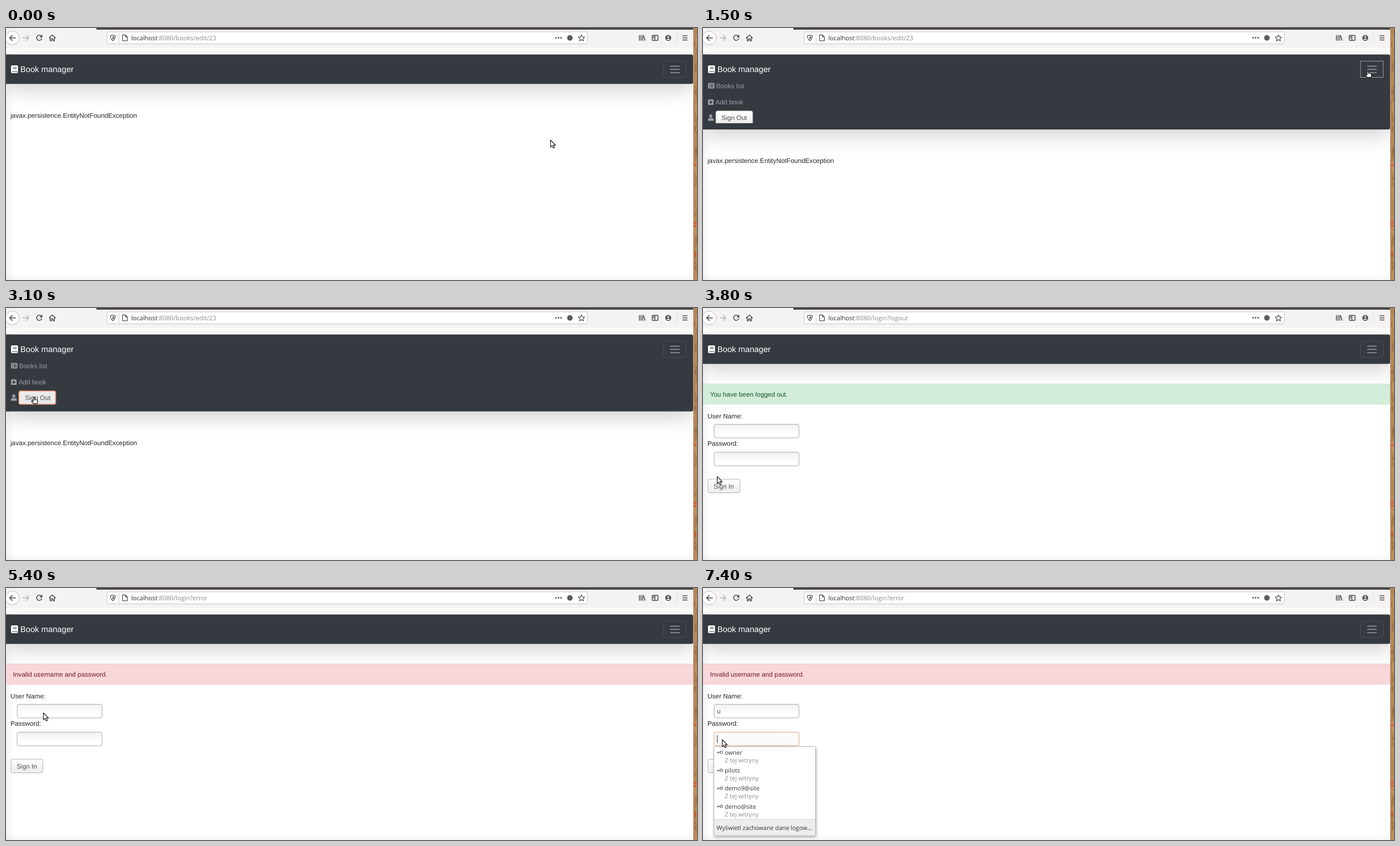
Recreate the animation shown at these times as an HTML page. Size 1238 by 452 pixels, loop 8 s.

```html
<!DOCTYPE html>
<html lang="en">
<head>
<meta charset="utf-8">
<title>Book manager</title>
<style>
html, body { margin: 0; width: 100%; height: 100%; overflow: hidden; background: #fff; }
svg { display: block; }
text { font: 11.75px "Liberation Sans", Arial, sans-serif; fill: #212529; text-rendering: geometricPrecision; white-space: pre; }
.ui text { font: 10.7px "Open Sans", "Noto Sans", sans-serif; fill: #2e3436; }
.ui #url { font-size: 11.2px; }
.ui .dim { fill: #8b8b89; }
.line { fill: none; stroke: #4c4c4c; stroke-width: 1.5; stroke-linecap: round; stroke-linejoin: round; }
#nav { fill: #353a41; filter: drop-shadow(0 11.75px 17.6px rgba(0,0,0,.175)); }
.menu text, .menu .icon { fill: #9a9ca0; }
.menu .cut { stroke: #353a41; fill: none; stroke-width: 1.2; }
.field { fill: url(#fieldFill); stroke: #adabaa; }
.field.on { stroke: #e79c7d; fill: #fafafa; }
.btn { fill: url(#btnFill); stroke: #b5b3b1; }
.btn.on { fill: #ebebeb; stroke: #df8a64; stroke-width: 1.5; }
.menu .btnText, .btnText { fill: #505356; }
#panel { fill: #fff; stroke: #b9b9b9; filter: drop-shadow(1px 2px 2.5px rgba(0,0,0,.3)); }
</style>
</head>
<body>
<svg width="1238" height="452" viewBox="0 0 1238 452">
  <defs>
    <linearGradient id="fieldFill" x2="0" y2="1"><stop stop-color="#f1f1f1"/><stop offset=".7" stop-color="#fff"/></linearGradient>
    <linearGradient id="btnFill" x2="0" y2="1"><stop stop-color="#fff"/><stop offset="1" stop-color="#ececec"/></linearGradient>
    <linearGradient id="sideFill"><stop stop-opacity=".045"/><stop offset="1" stop-opacity="0"/></linearGradient>
    <linearGradient id="baseFill" x2="0" y2="1"><stop stop-opacity="0"/><stop offset="1" stop-opacity=".035"/></linearGradient>
    <clipPath id="page"><rect y="36" width="1231" height="416"/></clipPath>
    <clipPath id="fold"><rect id="foldBox" y="89" width="1231"/></clipPath>
  </defs>

  <g clip-path="url(#page)">
    <rect width="1231" height="452" fill="#fff"/>
    <rect y="100" width="14" height="352" fill="url(#sideFill)"/>
    <rect y="438" width="1231" height="14" fill="url(#baseFill)"/>
    <rect id="nav" y="47.5" width="1231" rx="3"/>
    <rect id="navLeft" y="47.5" width="6" fill="#353a41"/>

    <rect x="9" y="67" width="12.5" height="14" rx="2" fill="#fff"/>
    <path d="M12.5 70.5h6.5M12.5 73h6.5M11 78.2h9" stroke="#353a41" stroke-width="1.1"/>
    <text x="25.7" y="79.3" style="font-size:14.7px;fill:#fff">Book manager</text>
    <rect id="toggler" x="1178" y="59.5" width="40.5" height="29" rx="3" fill="none"/>
    <path d="M1190 68.5h17M1190 74.3h17M1190 80.2h17" stroke="#9a9ca0" stroke-width="1.4"/>

    <g id="menu" class="menu" clip-path="url(#fold)">
      <rect class="icon" x="9" y="98.5" width="11.5" height="10" rx="1.5"/>
      <path class="cut" d="M11 101.2h1.4m1 0h5.2M11 103.6h1.4m1 0h5.2M11 106h1.4m1 0h5.2"/>
      <text x="23.5" y="108">Books list</text>
      <rect class="icon" x="9" y="128" width="10" height="10" rx="1.5"/>
      <path class="cut" style="stroke-width:1.6" d="M11 133h6M14 130v6"/>
      <text x="22.5" y="137">Add book</text>
      <circle class="icon" cx="14" cy="157.8" r="2.9"/>
      <path class="icon" d="M8.8 166.5v-1.7q0-3.4 3.4-3.4h3.6q3.4 0 3.4 3.4v1.7z"/>
      <rect id="signOut" class="btn" x="23" y="148.7" width="66" height="24" rx="3"/>
      <text id="signOutText" class="btnText" x="33" y="165">Sign Out</text>
    </g>

    <text id="fault" x="8">javax.persistence.EntityNotFoundException</text>

    <g id="login">
      <rect id="alert" x="-5" y="136.3" width="1236" height="36" rx="3"/>
      <text id="alertText" x="12.5" y="158.6"></text>
      <text x="8" y="197.5">User Name:</text>
      <rect id="user" class="field" x="20" y="208.7" width="152" height="24.3" rx="3"/>
      <text id="typed" class="btnText" x="25" y="225.3">u</text>
      <text x="8" y="247.3">Password:</text>
      <rect id="pass" class="field" x="20" y="258.7" width="152" height="24.3" rx="3"/>
      <path id="caret" stroke="#333"/>
      <rect class="btn" x="9" y="307" width="57" height="24.5" rx="3"/>
      <text class="btnText" x="19" y="323.7">Sign In</text>
    </g>
  </g>

  <g class="ui">
    <rect width="1231" height="36" fill="#f5f3f2"/>
    <path d="M162 0h1070v3H162z" fill="#4a4340"/>
    <path id="progress" d="M0 0h40v3H0z" fill="#a9cbed"/>
    <circle cx="11.3" cy="17.8" r="12.4" fill="#fdfdfd" stroke="#bcb9b7"/>
    <path class="line" d="M17 17.8H6.5m4.6-4.6-4.6 4.6 4.6 4.6"/>
    <path class="line" style="stroke:#b7b4b2" d="M30.5 17.8H41m-4.6-4.6 4.6 4.6-4.6 4.6"/>
    <g id="reload">
      <path class="line" d="M63.3 14.6a4.7 4.7 0 1 0 .7 4.5"/>
      <path d="M65 12v5h-5z" fill="#4c4c4c"/>
    </g>
    <path class="line" d="m77.5 17.8 5.5-5.3 5.5 5.3M79.3 17v6h2.3v-3.5h2.8V23h2.3v-6"/>
    <rect x="181" y="7" width="860.5" height="21.5" rx="2" fill="#fff" stroke="#c6c3c1"/>
    <path class="line" style="stroke-width:1.2" d="M191.5 12.5q2.2 1.4 4.3 1.2 0 6.2-4.3 9-4.3-2.8-4.3-9 2.1.2 4.3-1.2zm0 3v4.3q1.7-1.7 1.7-3.8z"/>
    <path d="M202.5 9.5v17" stroke="#c9c9c9"/>
    <path class="line" style="stroke-width:1.2" d="M208.7 12.4h5.3l3.4 3.4v7h-8.7zM214 12.4v3.4h3.4"/>
    <text id="url" x="224.5" y="22">localhost<tspan id="path" class="dim"></tspan></text>
    <g fill="#565656"><circle cx="985.5" cy="17.6" r="1.5"/><circle cx="990" cy="17.6" r="1.5"/><circle cx="994.5" cy="17.6" r="1.5"/></g>
    <circle cx="1010.3" cy="17.7" r="5" fill="#5c5c5c"/>
    <path class="line" style="stroke-width:1.2" d="m1031 12.2 1.7 3.7 4 .5-3 2.7.8 4-3.5-2-3.5 2 .8-4-3-2.7 4-.5z"/>
    <path class="line" d="M1134.8 13.3v9M1137.8 13.3v9M1140.8 13.3v9M1142.4 13.8l2.6 8.5"/>
    <rect class="line" x="1157.7" y="13.2" width="10.6" height="9" rx="1.5"/>
    <path class="line" d="M1162.5 13.5v8.5M1159.5 15.5h1.2M1159.5 17.8h1.2"/>
    <circle cx="1186.5" cy="17.7" r="5.3" fill="#4c4c4c"/>
    <circle cx="1186.5" cy="16" r="1.8" fill="#f5f3f2"/>
    <path d="M1183 19.3h7q-1 2.3-3.5 2.3t-3.5-2.3z" fill="#f5f3f2"/>
    <path d="M1201.5 8v20" stroke="#dedbd9"/>
    <path class="line" d="M1212.7 14h7.6M1212.7 17.7h7.6M1212.7 21.4h7.6"/>

    <g id="popup">
      <rect id="panel" x="19.5" y="234.5" width="182" height="160" rx="1"/>
      <path d="M20 365h181v29H20z" fill="#ededed"/>
      <path d="M20 365h181" stroke="#d2d2d2"/>
      <g id="items"></g>
      <text x="24.3" y="383.7">Wyświetl zachowane dane logow…</text>
    </g>
  </g>

  <g id="wood"><path d="M1232 0h6v452h-6z" fill="#b88350"/></g>
  <path d="M1231.5 0v452" stroke="#b3aaa3"/>

  <g id="cursor" stroke-linejoin="round">
    <path id="arrow" d="M0 0v12.6l2.9-2.7 2 4.6 2.2-1-2-4.4h4z" fill="#fff" stroke="#111" stroke-width="1.1"/>
    <path id="hand" d="M-1.2.6Q0-.9 1.2.6V4.2l4.2.8q1.5.4 1.4 2.4L6 11.6H-.7L-4 7.6q-.4-1.6 1.1-1.4l1.7 1.1z" fill="#fff" stroke="#111" stroke-width="1.2"/>
  </g>
</svg>

<script>
const $ = id => document.getElementById(id);
const set = (id, attrs) => { for (const k in attrs) $(id).setAttribute(k, attrs[k]); };
const show = (id, on) => { $(id).style.display = on ? '' : 'none'; };
const within = (t, ...spans) => spans.some(([a, b]) => t >= a && t < b);

$('items').innerHTML = ['owner', 'pilots', 'demo9@site', 'demo@site'].map((name, i) =>
  `<g transform="translate(0 ${i * 32.3})">
    <path d="M25 244.6h6M26 245v1.6M28 245v1.6" fill="none" stroke="#777" stroke-width="1.3"/>
    <circle cx="33" cy="244.6" r="2.2" fill="none" stroke="#777" stroke-width="1.3"/>
    <text x="39" y="248.7">${name}</text><text x="39" y="262.8" class="dim">Z tej witryny</text></g>`).join('');

// Wood grain of the desktop beside the window
let seed = 7;
const rnd = () => (seed = seed * 16807 % 2147483647) / 2147483647;
let grain = '';
for (let i = 0; i < 110; i++)
  grain += `<rect x="${1232 + rnd() * 4}" y="${rnd() * 452}" width="${1 + rnd() * 3}" height="${3 + rnd() * 16}" fill="${rnd() < .5 ? '#8d5d33' : '#cf9d68'}" opacity="${.15 + rnd() * .4}"/>`;
for (const y of [246, 349, 355, 405]) grain += `<circle cx="1234.5" cy="${y}" r="2" fill="#ee4a1c"/>`;
$('wood').innerHTML += grain;

// Pointer stops: time, x, y
const stops = [
  [0, 975.5, 201], [900, 1191, 77], [1500, 1191, 77], [1900, 163, 136],
  [2600, 50, 160], [3300, 50, 160], [3800, 25.5, 302.5], [4100, 30, 319],
  [5000, 30, 319], [5400, 67, 224], [6500, 67, 224], [6900, 183, 244],
  [7099, 183, 244], [7100, 28, 272], [7200, 28, 272], [7300, 34.5, 272], [8000, 34.5, 272]
];
const smooth = p => p * p * (3 - 2 * p);

function pointer(t) {
  const i = stops.findIndex((s, n) => n && t <= s[0]);
  const [a, x, y] = stops[i - 1], [b, u, v] = stops[i];
  const p = smooth((t - a) / (b - a));
  return [x + (u - x) * p, y + (v - y) * p];
}

// CSS "ease" curve, solved for its parameter by bisection
function ease(p) {
  if (p <= 0 || p >= 1) return p <= 0 ? 0 : 1;
  let lo = 0, hi = 1, s;
  for (let i = 0; i < 20; i++) {
    s = (lo + hi) / 2;
    if (.75 * s * (1 - s) * (1 - s) + .75 * s * s * (1 - s) + s ** 3 < p) lo = s; else hi = s;
  }
  return .3 * s * (1 - s) ** 2 + 3 * s * s * (1 - s) + s ** 3;
}

function draw(t) {
  const login = t >= 3200, error = t >= 4400;
  const open = login ? 0 : 85.3 * ease((t - 1240) / 350);
  set('nav', { height: 52.7 + open });
  set('navLeft', { height: 52.7 + open });
  set('foldBox', { height: open });
  show('menu', open > 0);
  const focus = within(t, [1100, 2900]);
  set('toggler', { stroke: focus ? '#9a9ca0' : '#4b5056', rx: focus ? 0 : 3 });
  set('signOut', { class: t >= 2900 ? 'btn on' : 'btn' });
  set('signOutText', { x: t >= 2900 ? 34 : 33 });

  show('fault', !login);
  set('fault', { y: 160.6 + open });
  show('login', login);
  set('alert', error ? { fill: '#f8d7da', stroke: '#f1c4c9' } : { fill: '#d4edda', stroke: '#c3e6cb' });
  $('alertText').textContent = error ? 'Invalid username and password.' : 'You have been logged out.';
  $('alertText').style.fill = error ? '#721c24' : '#155724';
  $('path').textContent = ':8080/' + (error ? 'login?error' : login ? 'login?logout' : 'books/edit/23');
  show('progress', within(t, [3200, 3500], [4400, 4900]));
  $('reload').style.opacity = within(t, [3200, 3700], [4400, 5100]) ? .4 : 1;

  const inPass = t >= 7300, inUser = t >= 5500 && !inPass;
  set('user', { class: inUser ? 'field on' : 'field' });
  set('pass', { class: inPass ? 'field on' : 'field' });
  show('typed', t >= 6500);
  show('caret', inUser || inPass);
  set('caret', { d: inPass ? 'M25.5 264v14' : t >= 6500 ? 'M32 214.5v13.5' : 'M25.5 214.5v13.5' });
  show('popup', within(t, [5500, 6600], [7400, 8000]));
  set('popup', { transform: `translate(0 ${inPass ? 50 : 0})` });

  const hand = within(t, [900, 1600], [2500, 3400], [4000, 5100]);
  show('hand', hand);
  show('arrow', !hand);
  set('cursor', { transform: `translate(${pointer(t)})` });
}

function tick() {
  draw(Math.floor(performance.now() % 8000 / 100) * 100);
  requestAnimationFrame(tick);
}
tick();
</script>
</body>
</html>
```
